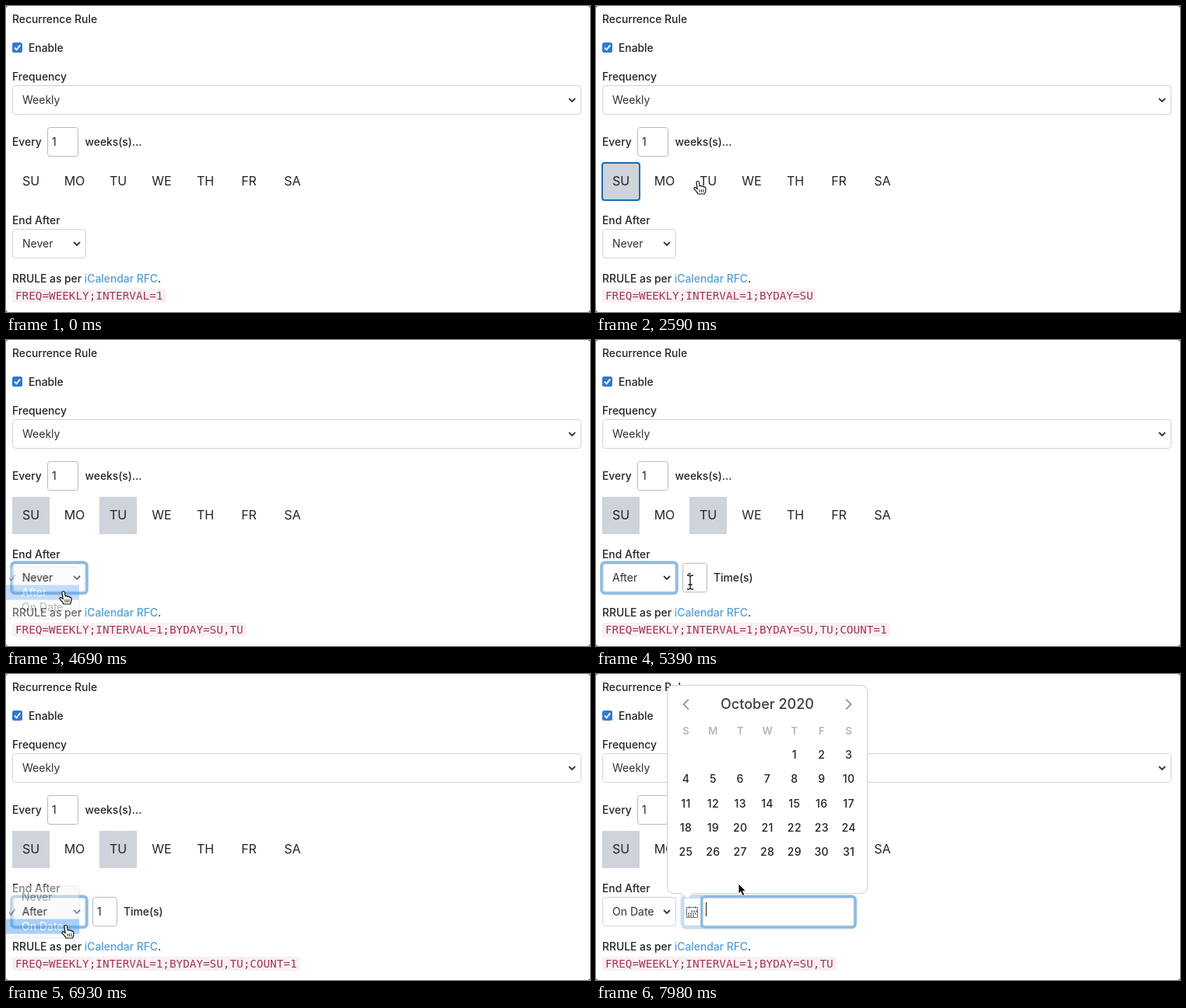
Recreate the animation shown at these times as an HTML page. Size 750x394 px, loop 8 s.

```html
<!DOCTYPE html>
<html lang="en">
<head>
<meta charset="utf-8">
<title>Recurrence rule</title>
<style>
  html, body { margin: 0; width: 100%; height: 100%; overflow: hidden; background: #777; }
  svg { display: block; width: 750px; height: 394px; }
  text { font: 400 14px Inter, sans-serif; fill: #212529; white-space: pre; }
  .label { font-size: 13.85px; font-weight: 500; }
  .value { fill: #2c3136; }
  .box { fill: #fff; stroke: #ced4da; }
  .number { fill: #fff; stroke: #b4bac4; }
  .chevron { fill: none; stroke: #343a40; stroke-width: 1.8; stroke-linecap: round; stroke-linejoin: round; }
  .arrow { fill: none; stroke: #82868c; stroke-width: 1.6; stroke-linecap: round; stroke-linejoin: round; }
  .ring { fill: none; stroke: #8eb8dc; stroke-width: 3; }
  .glow { fill: none; stroke: #c9def0; stroke-width: 5; }
  .day text { font-size: 16px; text-anchor: middle; }
  .code { font: 14.3px "DejaVu Sans Mono", monospace; fill: #a2365a; }
  #calendar text { text-anchor: middle; font-weight: 500; letter-spacing: .4px; }
  #calendar .title { font-size: 18px; fill: #3b3f45; letter-spacing: 0; }
  #calendar .weekday { font-size: 13px; font-weight: 600; fill: #b2b6bb; letter-spacing: 0; }
</style>
</head>
<body>
<svg viewBox="0 0 750 394">
  <rect width="750" height="394" rx="4" fill="#fff"/>
  <text class="label" x="8" y="22">Recurrence Rule</text>
  <rect x="8" y="47" width="13" height="13" rx="2.5" fill="#3079cf"/>
  <path d="M11 53.6l2.6 2.8l4.6-6" fill="none" stroke="#fff" stroke-width="1.8"/>
  <text class="label" x="29" y="59">Enable</text>
  <text class="label" x="8" y="96">Frequency</text>
  <rect class="box" x="8.5" y="102.5" width="730" height="37" rx="4"/>
  <text class="value" x="21" y="126">Weekly</text>
  <path class="chevron" d="M723.5 119.5l3.5 3.5l3.5-3.5"/>
  <text class="label" x="8" y="180">Every</text>
  <rect class="number" x="53.5" y="156.5" width="39" height="37" rx="3"/>
  <text x="59" y="180">1</text>
  <text class="label" x="101.5" y="180">weeks(s)...</text>
  <g id="days"></g>
  <text class="label" x="8" y="281">End After</text>

  <rect class="box" x="8.5" y="287.5" width="94" height="37" rx="4"/>
  <g id="selectRing">
    <rect class="glow" x="7.5" y="286.5" width="96" height="39.5" rx="5"/>
    <rect class="ring" x="7" y="286.5" width="97" height="39.5" rx="4"/>
  </g>
  <text class="value" id="ending" x="21" y="311"></text>
  <path class="chevron" d="M87.5 304.5l3.5 3.5l3.5-3.5"/>

  <g id="count">
    <rect class="number" x="111.5" y="287.5" width="31" height="37" rx="3"/>
    <text x="117" y="311">1</text>
    <text class="label" x="151" y="311">Time(s)</text>
  </g>

  <g id="date">
    <rect class="box" x="111.5" y="287.5" width="221" height="37" rx="4"/>
    <path d="M135.5 288v36" stroke="#ced4da"/>
    <g id="dateRing">
      <rect class="glow" x="111" y="286.5" width="222" height="39.5" rx="5"/>
      <path d="M135.5 286v40" stroke="#a5c7e4" stroke-width="3"/>
      <rect class="ring" x="136" y="286.5" width="197" height="39.5" rx="4"/>
      <path d="M141.5 294v18" stroke="#222"/>
    </g>
    <g fill="none" stroke="#70747a">
      <path d="M116.5 300.5h14v13h-14zM119.5 299v3M127.5 299v3"/>
      <path d="M122 305.5h8M118 308.5h12M118 311.5h9" stroke-width="2" stroke-dasharray="2 1"/>
    </g>
  </g>

  <text class="label" x="8" y="356">RRULE as per <tspan fill="#529dd5">iCalendar RFC</tspan>.</text>
  <rect id="codeBack" x="8" y="364" height="18" rx="3" fill="#f9f0f3"/>
  <text class="code" id="code" x="12" y="378"></text>

  <g id="calendar">
    <rect x="91.5" y="14.5" width="257" height="268" rx="8" fill="#fff" stroke="#cbced2"/>
    <path d="M109 282l8 7l8-7z" fill="#fff"/>
    <path d="M109 282.5l8 7l8-7" fill="none" stroke="#cbced2"/>
    <text class="title" x="220" y="45">October 2020</text>
    <path class="arrow" d="M118.5 33l-6 6l6 6M321.5 33l6 6l-6 6"/>
  </g>

  <g id="menu">
    <rect x="-5" y="-33" width="99" height="67" rx="5" fill="#f5f5f6" stroke="#d2d2d4"/>
    <rect id="highlight" x="-5" y="-10" width="99" height="19" fill="#479af0"/>
    <path id="check" d="M4 .5l2.5 3.5l5-7.5" fill="none" stroke="#333" stroke-width="1.4"/>
  </g>

  <circle id="click" r="30.5" fill="none" stroke="#111" stroke-width="1.5"/>
  <g id="pointer" stroke-linejoin="round">
    <g id="hand" fill="#fff" stroke="#111" stroke-width="1.2">
      <path d="M-2 1.5Q-2-.5-.3-.5T1.5 1.5L2.2 6Q4 4.6 5 6.5Q7 5.4 7.8 7.3Q10 6.8 10 9.5Q10 13 8.5 16H0Q-1.5 12.8-5 9.6Q-5.4 6.8-2.8 8L-.8 9.6Z"/>
      <path d="M2 10v4M4.4 10v4M6.8 10v4" stroke-width=".9"/>
    </g>
    <path id="arrow" d="M0 0V13L3 10.3L5.2 15.5L7.8 14.4L5.5 9.4H9.5Z" fill="#000" stroke="#fff"/>
    <g id="beam" fill="none">
      <path d="M-4-9Q0-9 0-7V7Q0 9-4 9M4-9Q0-9 0-7M0 7Q0 9 4 9M-2.5 3H2.5" stroke="#fff" stroke-width="2.6"/>
      <path d="M-4-9Q0-9 0-7V7Q0 9-4 9M4-9Q0-9 0-7M0 7Q0 9 4 9M-2.5 3H2.5" stroke="#111" stroke-width="1.3"/>
    </g>
  </g>
</svg>
<script>
const LOOP = 8000, STEP = 70, CODE_ADVANCE = 14.3 * 0.602;
const $ = id => document.getElementById(id);
const show = (id, on) => $(id).style.display = on ? '' : 'none';
const clamp = v => Math.max(0, Math.min(1, v));
const between = (t, a, b) => t >= a && t < b;

function add(parent, tag, attrs, content = '') {
  const el = document.createElementNS('http://www.w3.org/2000/svg', tag);
  for (const key in attrs) el.setAttribute(key, attrs[key]);
  el.textContent = content;
  return parent.appendChild(el);
}

const days = ['SU', 'MO', 'TU', 'WE', 'TH', 'FR', 'SA'].map((name, i) => {
  const g = add($('days'), 'g', { class: 'day' });
  const back = add(g, 'rect', { x: 8 + 56 * i, y: 202, width: 48, height: 48, fill: 'none' });
  add(g, 'text', { x: 32 + 56 * i, y: 231 }, name);
  return back;
});

const column = i => 115.5 + 34.85 * i;
[...'SMTWTFS'].forEach((name, i) =>
  add($('calendar'), 'text', { class: 'weekday', x: column(i), y: 78 }, name));
for (let d = 1; d <= 31; d++) {
  const cell = d + 3;
  add($('calendar'), 'text', { x: column(cell % 7), y: 109 + 31.25 * Math.floor(cell / 7) }, d);
}

const choices = ['Never', 'After', 'On Date'];
const rows = choices.map(name => add($('menu'), 'text', { x: 20 }, name));

// time, x, y of the pointer's hot spot
const path = [
  [280, 335, 400], [1120, 34, 237], [1470, 34, 237], [1540, 33, 229], [2100, 33, 229],
  [2590, 131, 226], [2870, 143, 222], [3290, 143, 222], [3780, 71, 304.5], [4200, 71, 304.5],
  [4550, 74, 324], [4760, 74, 324], [5390, 121, 312], [5460, 121, 312], [5670, 124, 312],
  [5810, 124, 312], [6160, 76, 305], [6440, 76, 305], [6720, 77, 324], [7070, 77, 324],
  [7490, 180, 305], [7770, 180, 305], [7980, 183, 270]
];
const clicks = [[1190, 1540], [1680, 1960], [3010, 3290], [3850, 4130], [6230, 6440], [7560, 7770]];
const menus = [
  { open: 4060, fade: 4550, close: 4760, selected: 0, target: 1, move: 4410 },
  { open: 6370, fade: 6790, close: 7050, selected: 1, target: 2, move: 6580 }
];

function pointerAt(t) {
  const next = path.findIndex(p => p[0] >= t);
  if (next < 1) return path[next < 0 ? path.length - 1 : 0].slice(1);
  const [t0, x0, y0] = path[next - 1], [t1, x1, y1] = path[next];
  const u = (t - t0) / (t1 - t0), e = u * u * (3 - 2 * u);
  return [x0 + (x1 - x0) * e, y0 + (y1 - y0) * e];
}

function drawDay(i, selected, focused) {
  const style = days[i].style;
  style.fill = selected ? '#cfd3da' : 'none';
  style.stroke = focused ? '#226bb0' : 'none';
  style.strokeWidth = 2;
  days[i].setAttribute('rx', focused ? 3 : 0);
}

function drawMenu(t) {
  const menu = menus.find(m => between(t, m.open, m.close));
  show('menu', menu);
  if (!menu) return;
  const active = t < menu.move ? menu.selected : menu.target;
  const rowY = i => 19 * (i - 1);
  $('menu').setAttribute('transform', `translate(0 ${306 + 19 * (1 - menu.selected)})`);
  $('menu').style.opacity = 1 - clamp((t - menu.fade) / (menu.close - menu.fade));
  $('highlight').setAttribute('y', rowY(active) - 9.5);
  $('check').setAttribute('transform', `translate(0 ${rowY(menu.selected)})`);
  $('check').style.stroke = active === menu.selected ? '#fff' : '#333';
  rows.forEach((row, i) => {
    row.setAttribute('y', rowY(i) + 5);
    row.style.fill = i === active ? '#fff' : '#333';
  });
}

function drawPointer(t) {
  const [x, y] = pointerAt(t);
  const overCalendar = t >= 7840;
  const overInput = between(t, 5180, 5950) || between(t, 7280, 7840);
  const overButton = between(t, 1050, 3430) || between(t, 3640, 5180) || between(t, 5950, 7280);
  show('pointer', t >= 350);
  show('beam', overInput);
  show('hand', overButton);
  show('arrow', overCalendar || !overInput && !overButton);
  $('pointer').setAttribute('transform', `translate(${x} ${y})`);
  show('click', clicks.some(([a, b]) => between(t, a, b)));
  $('click').setAttribute('cx', x);
  $('click').setAttribute('cy', y);
}

function draw(t) {
  const sunday = t >= 1820, tuesday = t >= 3150;
  const ending = t < 4760 ? 0 : t < 7000 ? 1 : 2;
  const dateFocused = t >= 7630;

  drawDay(0, sunday, sunday && !tuesday);
  drawDay(2, tuesday, tuesday && t < 4690);

  $('ending').textContent = choices[ending];
  show('selectRing', between(t, 1190, 1820) || between(t, 4690, 7630));
  show('count', ending === 1);
  show('date', ending === 2);
  show('dateRing', dateFocused);
  show('calendar', t >= 7700);

  const rule = 'FREQ=WEEKLY;INTERVAL=1' + (sunday ? ';BYDAY=SU' : '') +
    (tuesday ? ',TU' : '') + (ending === 1 ? ';COUNT=1' : '');
  $('code').textContent = rule;
  $('codeBack').setAttribute('width', rule.length * CODE_ADVANCE + 8);

  drawMenu(t);
  drawPointer(t);
}

const start = performance.now();
function tick() {
  const t = (performance.now() - start) % LOOP;
  draw(Math.floor(t / STEP) * STEP);
  requestAnimationFrame(tick);
}
tick();
</script>
</body>
</html>
```
